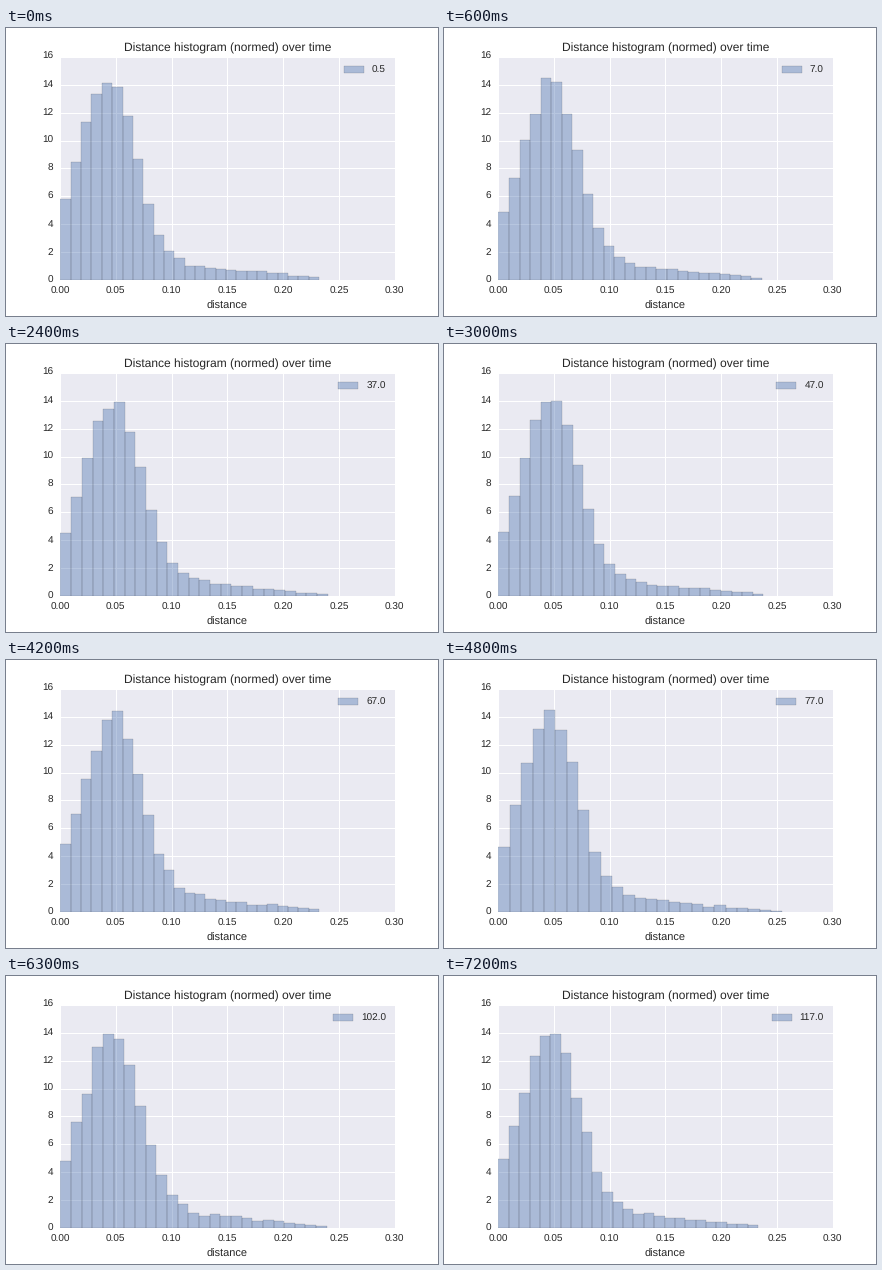
A matplotlib script that plays this animation: 432 px wide and 288 px high, repeating every 7500 ms.

```python
import numpy as np
import matplotlib.pyplot as plt
from matplotlib.animation import FuncAnimation

FRAMES, INTERVAL = 25, 300
BINS = 25
START = 0.0004

plt.rcParams.update({
    "font.family": "Liberation Sans",
    "font.size": 10,
    "text.hinting": "none",
    "text.color": "0.15",
    "axes.facecolor": "#EAEAF2",
    "axes.linewidth": 0,
    "axes.edgecolor": "white",
    "axes.axisbelow": True,
    "axes.grid": True,
    "axes.titlesize": 12,
    "axes.titlepad": 5,
    "axes.labelsize": 11,
    "axes.labelcolor": "0.15",
    "grid.color": "white",
    "grid.linewidth": 1,
    "xtick.color": "0.15",
    "ytick.color": "0.15",
    "xtick.major.size": 0,
    "ytick.major.size": 0,
    "xtick.major.pad": 7,
    "ytick.major.pad": 7,
    "ytick.alignment": "center",
})

# Largest distance at a few steps.
END_STEPS = [0, 5, 10, 14, 16, 19, 24]
ENDS = [0.2321, 0.2428, 0.2379, 0.2321, 0.2549, 0.2431, 0.2330]


def profile(x, peak):
    """Lopsided bell with a long, thin tail."""
    spread = np.where(x < peak, 0.029, 0.0246)
    bell = 14.5 * np.exp(-0.5 * ((x - peak) / spread) ** 2)
    return bell + np.interp(x, [0.06, 0.11, 0.25], [0, 1.1, 0.05])


def histogram(step):
    """Left edges, bin width and normed heights at a step."""
    rng = np.random.default_rng(step)
    end = np.interp(step, END_STEPS, ENDS)
    width = (end - START) / BINS
    left = START + width * np.arange(BINS)
    peak = 0.048 - 0.004 * np.exp(-step)
    heights = profile(left + width / 2, peak)
    heights += 0.08 * np.sqrt(heights) * rng.standard_normal(BINS)
    return left, width, heights / (heights.sum() * width)


def time_label(step):
    return f"{5 * step - 3 if step else 0.5:.1f}"


fig = plt.figure(figsize=(6, 4), dpi=72, facecolor="white")
ax = fig.add_axes([0.125, 0.125, 0.775, 0.775])
bars = ax.bar(range(BINS), np.ones(BINS), align="edge", color="#4C72B0",
              edgecolor="black", linewidth=0.3, alpha=0.4, label="0.5")
legend = ax.legend(loc="upper right", frameon=False)
ax.set(xlim=(0, 0.3), ylim=(0, 16), xticks=np.arange(7) * 0.05,
       yticks=range(0, 17, 2), title="Distance histogram (normed) over time")
ax.xaxis.set_major_formatter("{x:.2f}")
ax.set_xlabel("distance", va="baseline")
ax.xaxis.set_label_coords(0.5, -0.13)


def update(step):
    left, width, heights = histogram(step)
    for bar, x, h in zip(bars, left, heights):
        bar.set(x=x, width=width, height=h)
    legend.get_texts()[0].set_text(time_label(step))
    return [*bars, legend]


anim = FuncAnimation(fig, update, frames=FRAMES, interval=INTERVAL,
                     repeat=True, repeat_delay=0, blit=False)
plt.show()
```
